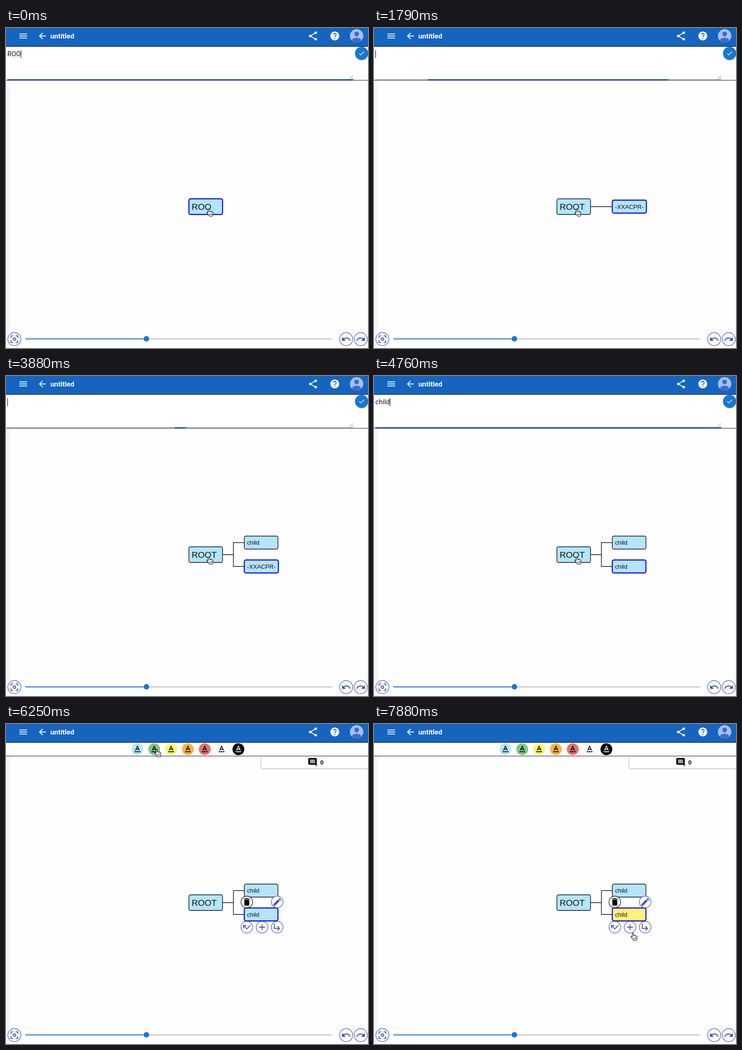
These frames come from a looping animation (796 by 704 pixels, 8000 ms). An HTML page:

```html
<!DOCTYPE html>
<html lang="en">
<head>
<meta charset="utf-8">
<title>Mind map editor</title>
<style>
html, body { margin: 0; width: 100%; height: 100%; overflow: hidden; background: #fff; }
svg { display: block; }
text { white-space: pre; }
.ui { font-family: Roboto, sans-serif; }
.node { font-family: "Liberation Sans", Arial, sans-serif; }
</style>
</head>
<body>
<svg id="stage" width="796" height="704" viewBox="0 0 796 704">
  <rect width="796" height="704" fill="#fefefe"/>
  <path d="M0 71H9V704H0ZM794 71H796V704H794Z" fill="#f5f5f5"/>
  <g id="map"></g>
  <g id="footer"></g>
  <g id="panel"></g>
  <g id="header"></g>
  <g id="hand" fill="#fff" stroke="#000" stroke-width="1.1" stroke-linejoin="round">
    <path d="M0 1.5C0-.3 2.8-.3 2.8 1.5V5.5C3.5 4.6 5.2 4.8 5.4 6 6.3 5.2 7.7 5.6 7.9 6.8 9 6.2 10.3 6.8 10.3 8.2V11.5C10.3 13.5 9.3 14 9.3 16H2.8C2.8 14.5-.6 11.5-2.8 8.8-3.6 7.4-1.6 6.4-.4 7.8L0 8.2Z"/>
    <path d="M3.6 10V13M5.6 10V13M7.6 10V13" stroke-width=".9"/>
  </g>
</svg>
<script>
const LOOP = 8000, INDIGO = '#3f51b5', SKY = '#b3e5fc';
const $ = id => document.getElementById(id);

// Icons on a 24 x 24 grid
const ICONS = {
  menu: 'M3 18h18v-2H3v2zm0-5h18v-2H3v2zm0-7v2h18V6H3z',
  back: 'M20 11H7.83l5.59-5.59L12 4l-8 8 8 8 1.41-1.41L7.83 13H20v-2z',
  help: 'M12 2C6.48 2 2 6.48 2 12s4.48 10 10 10 10-4.48 10-10S17.52 2 12 2zm1 17h-2v-2h2v2zm2.07-7.75l-.9.92C13.45 12.9 13 13.5 13 15h-2v-.5c0-1.1.45-2.1 1.17-2.83l1.24-1.26c.37-.36.59-.86.59-1.41 0-1.1-.9-2-2-2s-2 .9-2 2H8c0-2.21 1.79-4 4-4s4 1.79 4 4c0 .88-.36 1.68-.93 2.25z',
  check: 'M9 16.17L4.83 12l-1.42 1.41L9 19 21 7l-1.41-1.41z',
  letter: 'M5 17v2h14v-2H5zm4.5-4.2h5l.9 2.2h2.1L12.75 4h-1.5L6.5 15h2.1l.9-2.2zM12 5.98L13.87 11h-3.74L12 5.98z',
  comment: 'M21.99 4c0-1.1-.89-2-1.99-2H4c-1.1 0-2 .9-2 2v12c0 1.1.9 2 2 2h14l4 4-.01-18zM18 14H6v-2h12v2zm0-3H6V9h12v2zm0-3H6V6h12v2z',
  trash: 'M6 19c0 1.1.9 2 2 2h8c1.1 0 2-.9 2-2V7H6v12zM19 4h-3.5l-1-1h-5l-1 1H5v2h14V4z',
  pen: 'M3 17.25V21h3.75L17.81 9.94l-3.75-3.75L3 17.25zM20.71 7.04c.39-.39.39-1.02 0-1.41l-2.34-2.34c-.39-.39-1.02-.39-1.41 0l-1.83 1.83 3.75 3.75 1.83-1.83z',
  sibling: 'M19.59 7L12 14.59 6.41 9H11V7H3v8h2v-4.59l7 7 9-9z',
  plus: 'M19 13h-6v6h-2v-6H5v-2h6V5h2v6h6v2z',
  child: 'M19 15l-6 6-1.42-1.42L15.17 16H4V4h2v10h9.17l-3.59-3.58L13 9l6 6z',
  undo: 'M12.5 8c-2.65 0-5.05.99-6.9 2.6L2 7v9h9l-3.62-3.62c1.39-1.16 3.16-1.88 5.12-1.88 3.54 0 6.55 2.31 7.6 5.5l2.37-.78C21.08 11.03 17.15 8 12.5 8z',
  focus: 'M5 15H3v4c0 1.1.9 2 2 2h4v-2H5v-4zM5 5h4V3H5c-1.1 0-2 .9-2 2v4h2V5zm14-2h-4v2h4v4h2V5c0-1.1-.9-2-2-2zm0 16h-4v2h4c1.1 0 2-.9 2-2v-4h-2v4zM12 8c-2.21 0-4 1.79-4 4s1.79 4 4 4 4-1.79 4-4-1.79-4-4-4zm0 6c-1.1 0-2-.9-2-2s.9-2 2-2 2 .9 2 2-.9 2-2 2z'
};

const icon = (name, x, y, color, size = .93, flip = 1) =>
  `<path transform="translate(${x} ${y}) scale(${size * flip} ${size}) translate(-12 -12)" fill="${color}" d="${ICONS[name]}"/>`;
const circle = (x, y, r, fill, extra = '') => `<circle cx="${x}" cy="${y}" r="${r}" fill="${fill}" ${extra}/>`;
const rect = (x, y, w, h, fill, extra = '') =>
  `<rect x="${x}" y="${y}" width="${w}" height="${h}" fill="${fill}" ${extra}/>`;
const line = (d, color, width) => `<path d="${d}" fill="none" stroke="${color}" stroke-width="${width}"/>`;
const label = (x, y, size, str, cls, extra = '') =>
  `<text class="${cls}" x="${x}" y="${y}" font-size="${size}" ${extra}>${str}</text>`;
const round = (name, x, y, r, color = INDIGO, size, flip) =>
  circle(x, y, r, '#fff', `stroke="${color}" stroke-width="1.2"`) + icon(name, x, y, color, size, flip);

$('header').innerHTML =
  rect(0, 0, 796, 40, '#1565c0') + rect(0, 40, 796, 1.2, '#111') +
  icon('menu', 37.8, 17.5, '#fff') + icon('back', 80, 17.5, '#fff') +
  label(97.5, 22.5, 15.4, 'untitled', 'ui', 'fill="#fff" font-weight="700"') +
  line('M681 10.5L669 17.5L681 24.5', '#fff', 1.9) +
  [[681, 10.5], [669, 17.5], [681, 24.5]].map(p => circle(...p, 2.8, '#fff')).join('') +
  icon('help', 723, 17.5, '#fff', .97) +
  circle(771, 17.3, 14.7, '#a3c0fa') + circle(771, 13, 5.2, '#4468c8') +
  '<path d="M761.5 28.5V26.5C761.5 19.7 780.5 19.7 780.5 26.5V28.5A14.7 14.7 0 0 1 761.5 28.5Z" fill="#4468c8"/>';

$('footer').innerHTML =
  line('M309 684H717.5', '#bdbdbd', 2) + line('M42.5 684H309', '#1976d2', 2) +
  circle(308.7, 683.8, 6, '#1976d2') +
  round('focus', 18.5, 684.5, 14.4) + round('undo', 748, 684.5, 14.4) +
  round('undo', 780, 684.5, 14.4, INDIGO, .93, -1);

const PALETTE = [SKY, '#81c784', '#fff176', '#ffb342', '#e57373', '#fff', '#000'];
const MENU =
  rect(0, 41, 796, 30, '#fff') + line('M0 70.5H796', '#111', 1.2) +
  PALETTE.map((c, i) => circle(289 + 37 * i, 55.5, 13, c) +
    icon('letter', 289 + 37 * i, 55.5, i == 6 ? '#fff' : '#000')).join('') +
  '<path d="M560.5 71.5V95Q560.5 98.5 564 98.5H796V71.5Z" fill="#fff"/>' +
  line('M560.5 73V95Q560.5 98.5 564 98.5H796', '#c4c4c4', 1.4) +
  icon('comment', 674, 84, '#000') +
  label(691, 89, 12.5, '0', 'ui', 'font-weight="700"');

const FIELD =
  rect(0, 41, 796, 74, '#fff') + line('M0 115H796', '#111', 1.2) +
  line('M3 113.3H763.5', '#8c8c8c', 1) +
  line('M755 112.5L763 104.5M760 112.5L763 109.5', '#777', 1) +
  circle(782, 57, 14.8, '#0003') + circle(782, 55.7, 14.5, '#1976d2') +
  icon('check', 782, 55.7, '#fff', .66);

function field(text, caret, scale) {
  $('panel').innerHTML = FIELD + rect(383.2 - 380.2 * scale, 112.8, 760.4 * scale, 2.3, '#0d47a1') +
    label(3, 62, 14.6, text, 'ui', 'id="typed" letter-spacing=".14" fill="#111"');
  const x = 3 + (text ? $('typed').getComputedTextLength() : 0);
  if (caret) $('panel').innerHTML += rect(x, 49, 1.1, 17, '#000');
}

function node(x, cy, h, text, selected, size, fill = SKY) {
  const pen = selected ? 'stroke="#1510f0" stroke-width="2.4"' : 'stroke="#111" stroke-width="1.4"';
  const w = text ? 74 : 75;
  return rect(x, cy - h / 2, w, h, fill, 'rx="3.5" ' + pen) +
    label(x + 6, cy + size * .36, size, text || '-XXACPR-', 'node', 'fill="#111"');
}

// [start, mode, root, first child, second child, caret, underline scale]
const STATES = [
  [0, 'edit', 'ROO'], [300, 'edit', 'ROOT'], [750, 'edit', 'ROOT', null, null, false],
  [1040, 'menu', 'ROOT'],
  [1790, 'edit', 'ROOT', '', null, true, .696], [1940, 'edit', 'ROOT', ''],
  [2090, 'edit', 'ROOT', 'c'], [2240, 'edit', 'ROOT', 'ch'], [2390, 'edit', 'ROOT', 'chi'],
  [2540, 'edit', 'ROOT', 'chil'], [2840, 'edit', 'ROOT', 'child'],
  [3430, 'edit', 'ROOT', 'child', null, false],
  [3880, 'edit', 'ROOT', 'child', '', true, .033], [4020, 'edit', 'ROOT', 'child', ''],
  [4170, 'edit', 'ROOT', 'child', 'c'], [4320, 'edit', 'ROOT', 'child', 'ch'],
  [4460, 'edit', 'ROOT', 'child', 'chi'], [4610, 'edit', 'ROOT', 'child', 'chil'],
  [4760, 'edit', 'ROOT', 'child', 'child'], [5360, 'edit', 'ROOT', 'child', 'child', false],
  [5800, 'menu', 'ROOT', 'child', 'child']
];

// Pointer stops: [step, x, y]
const PATH = [[0, 444.5, 398], [3, 330, 56], [5, 330, 56], [7, 367, 56], [9, 367, 56], [14, 568, 460]];
function pointer(step) {
  const i = Math.max(1, PATH.findIndex(p => p[0] >= step));
  const [s0, x0, y0] = PATH[i - 1], [s1, x1, y1] = PATH[i];
  const u = (step - s0) / (s1 - s0), k = u * u * (3 - 2 * u);
  return [x0 + (x1 - x0) * k, y0 + (y1 - y0) * k];
}

function draw([, mode, root, a = null, b = null, caret = true, scale = 1], fill) {
  const menu = mode == 'menu';
  const two = b !== null, one = a !== null;
  let map = '';
  if (one) map += line(two ? 'M476 393H500M524 366.5H500V419H524' : 'M476 393H524', '#111', 1.4);
  map += node(402.2, 393, 34.5, root, !one, 19.1);
  if (one) map += node(524, two ? 366.5 : 393, 28.5, a, !two, 13.2);
  if (two) map += node(524, 419, 28.5, b, true, 13.2, fill);
  if (menu && two) {
    map += round('trash', 529.5, 391.5, 12.8, '#000', .9) + round('pen', 596.3, 391.5, 12.8) +
      round('sibling', 529.5, 447, 12.8) + round('plus', 563, 447, 12.8) + round('child', 596.3, 447, 12.8);
  } else if (menu) {
    map += round('pen', 474.5, 362.5, 12.8) + round('child', 474.5, 424.5, 12.8);
  }
  $('map').innerHTML = map;
  if (menu) $('panel').innerHTML = MENU;
  else field(two ? b : one ? a : root, caret, scale);
}

let shown = '';
function tick(now) {
  const t = now % LOOP;
  const state = STATES.findLast(s => s[0] <= t);
  const step = Math.max(0, Math.min(14, Math.floor((t - 5799) / 148.6)));
  const fill = step < 4 ? SKY : step < 8 ? PALETTE[1] : PALETTE[2];
  const key = state[0] + fill;
  if (key != shown) draw(state, fill);
  shown = key;
  $('hand').setAttribute('transform', `translate(${pointer(step)})`);
  requestAnimationFrame(tick);
}
tick(0);
</script>
</body>
</html>
```
